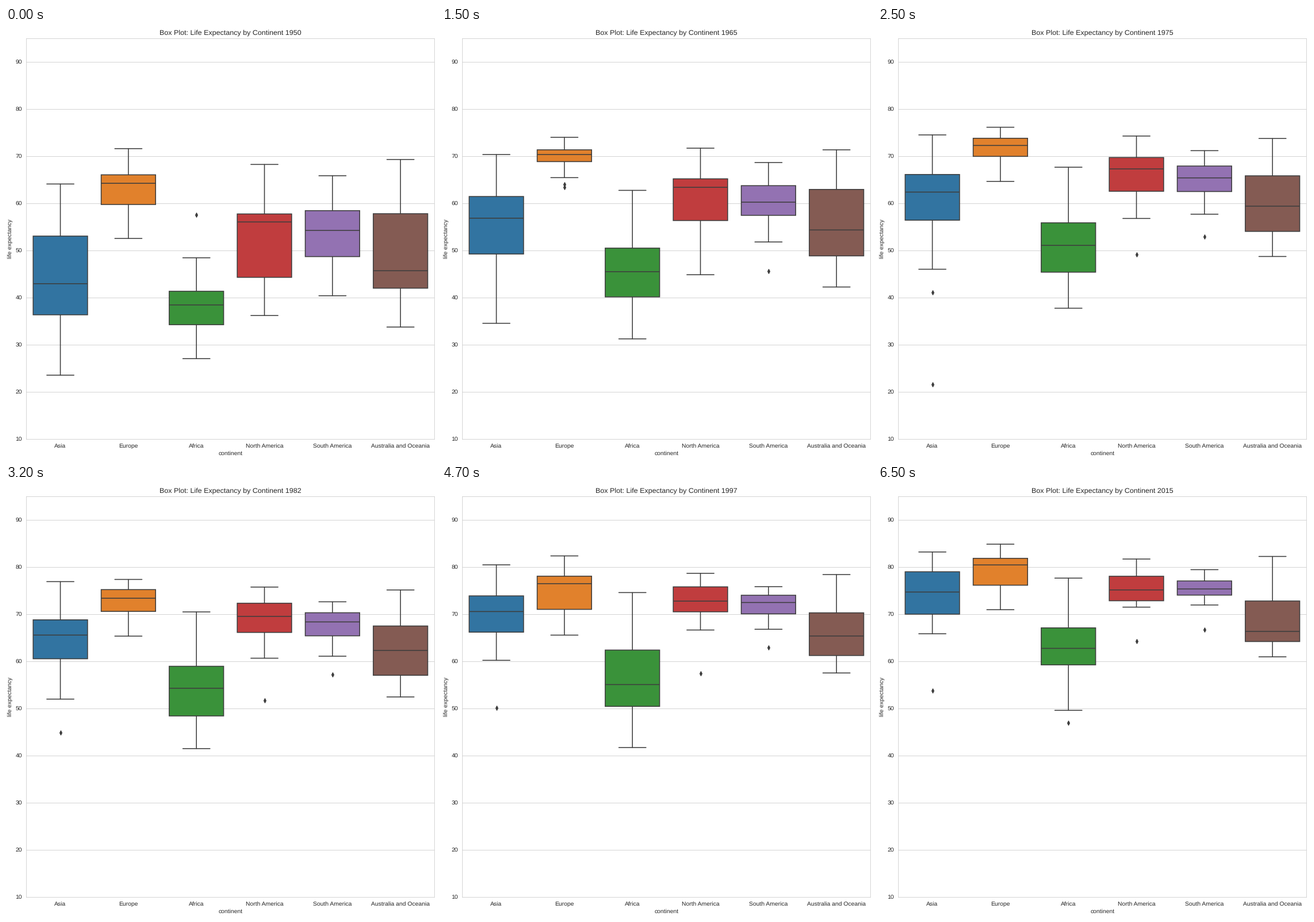
These frames come from a looping animation (748 px wide and 748 px high, 6.6 s). A matplotlib script:

```python
import matplotlib.pyplot as plt
import numpy as np
from matplotlib.animation import FuncAnimation
from matplotlib.patches import Rectangle

SIZE, DPI = 748, 88
K = 0.85  # scale for all point sizes
FIRST, LAST = 1950, 2015
INK, TEXT, GRID = "#3d3d3d", "#262626", "#cccccc"

plt.rcParams.update({
    "font.family": "Liberation Sans",
    "text.hinting": "none",
    "text.color": TEXT,
    "axes.labelcolor": TEXT,
    "axes.edgecolor": GRID,
    "axes.linewidth": 0.8 * K,
})

fig = plt.figure(figsize=(SIZE / DPI, SIZE / DPI), dpi=DPI, facecolor="white")
ax = fig.add_axes([35.4 / SIZE, 32.6 / SIZE, 710 / SIZE, 697 / SIZE])
ax.set(xlim=(-0.5, 5.5), ylim=(10, 95))
ax.set_axisbelow(True)
ax.grid(axis="y", color=GRID, lw=0.8 * K)
ax.tick_params(length=3.5 * K, pad=3.5 * K, labelsize=10 * K,
               bottom=False, left=False, labelcolor=TEXT)
ax.set_yticks(range(10, 91, 10))
ax.set_xlabel("continent", fontsize=10 * K, labelpad=4 * K)
ax.set_ylabel("life expectancy", fontsize=10 * K, labelpad=4 * K)
title = ax.set_title("", fontsize=12 * K, pad=6 * K)


def pace(year):
    """Progress that slows down as the years go by."""
    return np.log(np.asarray(year) - 1930)


KEYS = pace((1950, 1965, 1989, 2015))


def level(year, keys):
    return np.interp(pace(year), KEYS, keys)


def late_wave(year):
    """Zero until 1989, one arch from there to the last year."""
    t = (pace(year) - KEYS[2]) / (KEYS[3] - KEYS[2])
    return np.sin(np.pi * np.clip(t, 0, 1))


class Box:
    """Quartiles plus a few extreme members; the 1.5 IQR rule sorts
    the extremes into whisker ends and outlier dots."""

    def __init__(self, x, color, tops, q3, median, q1, lows,
                 bend=(0, 0, 0, 0, 0), crises=None):
        self.x = x
        self.groups = (tops, [q3], [median], [q1], lows)
        self.bend = bend
        self.crises = crises or {}
        self.body = ax.add_patch(Rectangle((x - 0.4, 0), 0.8, 1, fc=color,
                                           ec=INK, lw=1.5 * K, zorder=2,
                                           snap=False))
        self.lines = [ax.plot([], [], color=INK, lw=1.5 * K, zorder=3,
                              solid_capstyle=cap, snap=False)[0]
                      for cap in ("butt",) + ("round",) * 4]
        self.dots, = ax.plot([], [], "d", color=INK, ms=5 * K, mew=K,
                             zorder=4, snap=False)

    def update(self, year):
        wave = late_wave(year)
        tops, (q3,), (median,), (q1,), lows = (
            [level(year, keys) + b * wave for keys in group]
            for group, b in zip(self.groups, self.bend))
        if year in self.crises:
            lows.append(self.crises[year])

        reach = 1.5 * (q3 - q1)
        ends = tops + lows
        inside = [v for v in ends if q1 - reach <= v <= q3 + reach]
        outside = [v for v in ends if v not in inside]
        high, low = max(inside), min(inside)

        x = self.x
        self.body.set_y(q1)
        self.body.set_height(q3 - q1)
        spans = (
            ((x - 0.4, x + 0.4), (median, median)),
            ((x, x), (q3, high)),
            ((x, x), (low, q1)),
            ((x - 0.2, x + 0.2), (high, high)),
            ((x - 0.2, x + 0.2), (low, low)),
        )
        for line, span in zip(self.lines, spans):
            line.set_data(*span)
        self.dots.set_data([x] * len(outside), outside)


asia = Box(
    0, "#3274a1",
    tops=[(64.15, 70.4, 79.05, 83.25)],
    q3=(53.1, 61.5, 71.2, 79.05),
    median=(43.0, 56.9, 68.4, 74.75),
    q1=(36.4, 49.3, 64.2, 70.05),
    lows=[(23.6, 34.6, 48.2, 53.8), (26, 35.7, 57.25, 65.9)],
    crises={y: 18 + 0.9 * (y - 1977) ** 2 for y in range(1975, 1980)})

europe = Box(
    1, "#e1812c",
    tops=[(71.65, 74.05, 78.5, 84.9)],
    q3=(66.1, 71.4, 76.5, 81.9),
    median=(64.3, 70.4, 74.4, 80.5),
    q1=(59.8, 68.9, 71.2, 76.2),
    lows=[(52.6, 63.5, 66, 71), (54, 64.1, 66.4, 71.4), (55, 65.5, 67, 72)],
    bend=(1.9, -0.3, 0, -2.1, -2.4))

africa = Box(
    2, "#3a923a",
    tops=[(57.65, 62.8, 73, 77.7), (48.5, 60.4, 72, 77)],
    q3=(41.4, 50.55, 61.7, 67.15),
    median=(38.5, 45.55, 57.15, 62.8),
    q1=(34.3, 40.2, 51.1, 59.3),
    lows=[(27.1, 31.3, 44.8, 47.05), (28, 33, 46, 49.65)],
    bend=(0, -1.3, -4.5, -3.9, -4.3),
    crises={1990: 35.9, 1994: 13.15, 1999: 37.7})

north = Box(
    3, "#c03d3e",
    tops=[(68.3, 71.75, 77.1, 81.75)],
    q3=(57.8, 65.25, 74.65, 78.1),
    median=(56.1, 63.45, 71.55, 75.2),
    q1=(44.35, 56.4, 69.3, 72.9),
    lows=[(36.25, 44.9, 53.9, 64.3), (42, 50.1, 64.1, 71.55)],
    crises={2010: 32.2})

south = Box(
    4, "#9372b2",
    tops=[(65.9, 68.7, 73.95, 79.5)],
    q3=(58.5, 63.8, 72.45, 77.1),
    median=(54.3, 60.3, 71, 75.4),
    q1=(48.75, 57.5, 68, 74.1),
    lows=[(40.45, 45.6, 60.9, 66.75), (46, 51.85, 64.1, 72)])

oceania = Box(
    5, "#845b53",
    tops=[(69.35, 71.4, 76.4, 82.3)],
    q3=(57.85, 63, 69, 72.85),
    median=(45.75, 54.4, 64.9, 66.4),
    q1=(42.05, 48.9, 59.7, 64.25),
    lows=[(33.8, 42.3, 55.75, 61)])

boxes = (asia, europe, africa, north, south, oceania)
ax.set_xticks(range(6), ["Asia", "Europe", "Africa", "North America",
                         "South America", "Australia and Oceania"])


def draw(frame):
    year = FIRST + frame
    title.set_text(f"Box Plot: Life Expectancy by Continent {year}")
    for box in boxes:
        box.update(year)
    return []


anim = FuncAnimation(fig, draw, frames=LAST - FIRST + 1, interval=100,
                     init_func=lambda: draw(0), repeat=True, repeat_delay=0)
plt.show()
```
